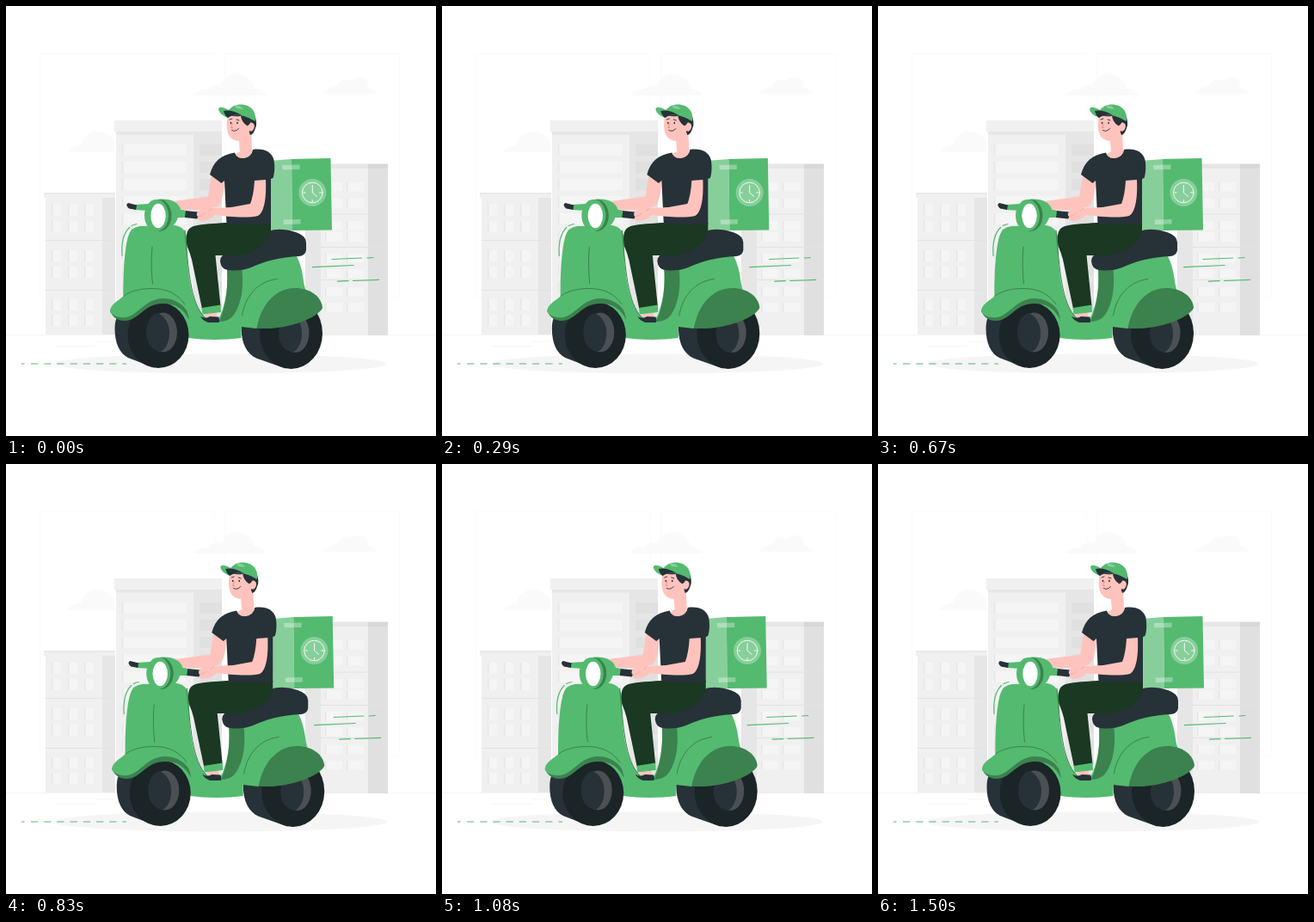
Recreate the animation shown at these times as an HTML page. Size 500 by 500 pixels, loop 1.54 s.

```html
<!DOCTYPE html>
<html lang="en">
<head>
<meta charset="utf-8">
<title>Scooter delivery</title>
<style>
  html, body { margin: 0; width: 100%; height: 100%; overflow: hidden; background: #fff; }
  svg { display: block; width: 100vw; height: 100vh; }
  .green { fill: #54ba6f; }
  .shade { fill: #3b824e; }
  .mint { fill: #87cf9a; }
  .glow { fill: #fff; fill-opacity: .32; }
  .dark { fill: #263238; }
  .tyre { fill: #1b2427; }
  .rim { fill: #4a5053; }
  .skin { fill: #ffc3bd; }
  .pants { fill: #1a3822; }
  .wall { fill: #f0f0f0; }
  .side { fill: #e6e6e6; }
  .deep { fill: #e0e0e0; }
  .pale { fill: #f5f5f5; }
  .cloud { fill: #fafafa; }
  .line { fill: none; stroke: #54ba6f; stroke-width: 1.2; stroke-linecap: round; }
  .crease { fill: none; stroke: #3b824e; stroke-width: 1; stroke-linecap: round; }
  .ink { fill: none; stroke: #263238; stroke-width: .9; stroke-linecap: round; }
  .faint { fill: none; stroke: #fafafa; }
  .floor { fill: none; stroke: #e2e2e2; }
  .white { fill: none; stroke: #fff; stroke-width: .9; stroke-linecap: round; }
</style>
</head>
<body>
<svg viewBox="0 0 500 500">
  <path class="faint" d="M39.500 55.500H242.500V339H39.500ZM254.500 55.500H457.500V339H254.500Z"/>
  <path class="faint" style="stroke:#f5f5f5" d="M0 382.500H500M57 395.500H104M105 390H126"/>

  <g class="cloud">
    <path d="M218 104C222 99 228 96 235 97C239 91 245 91 250 92C254 80 270 75 280 83C286 86 288 90 288 96C295 96 300 99 303 104Z"/>
    <path d="M368 102C372 96 378 94 384 94C386 87 394 84 401 87C407 81 416 82 420 87C421 90 420 93 420 95C426 95 430 98 432 102Z"/>
    <path d="M72 170C75 164 80 162 87 162C89 150 101 143 113 147C119 149 124 153 126 158V170Z"/>
  </g>

  <g id="city">
    <path class="wall" d="M126 133H251V146H126ZM128 146H218V382H128Z"/>
    <path class="side" d="M218 149H251V382H218ZM128 146H251V149.500H128Z"/>

    <path class="wall" d="M44 217H127V223H112V382H46V223H44Z"/>
    <path class="side" d="M112 223H127V382H112Z"/>
    <path class="floor" d="M44 218H127M46 272.500H127M46 330.500H127"/>

    <path class="wall" d="M366 184H421V383H366Z"/>
    <path class="side" d="M348 258H366V383H348ZM366 183.500H421V189H366Z"/>
    <path class="deep" d="M421 184H444V383H421Z"/>
    <path fill="#d8d8d8" d="M421 183.500H444V189H421Z"/>
    <path class="floor" d="M366 242H444M366 280.500H444M366 318.500H444"/>
  </g>

  <ellipse class="pale" cx="250" cy="416" rx="193" ry="11.500"/>
  <path class="line" style="stroke-linecap:butt" stroke-dasharray="8.3 6.9" d="M18 416H21.500M29 416H140"/>

  <g id="ride">
    <g class="line">
      <path d="M379 294.500L413.500 293M420 293L427 292.500M356.500 303.700L404 301.500M385.500 320.200L398 319.700M403.500 319.500L433.500 318.300"/>
      <path d="M135 290.500C134 278 136 265 143.500 257.500M146 255.500Q149 254 152 253.500"/>
    </g>

    <!-- Parcel box -->
    <path class="mint" d="M307 180L332 178L333 261H306Z"/>
    <path class="green" d="M332 178L377.500 177L379 260.500L333 261Z"/>
    <path class="glow" d="M321 185L341.500 184.500V190L321.500 190.200ZM322.500 248.500L342.500 248V253.500L323 254Z"/>
    <circle class="mint" cx="356.300" cy="217" r="16"/>
    <circle class="white" cx="356.300" cy="217" r="11.800"/>
    <path class="white" d="M356.300 208.500V217L361.500 221.500M356.300 225.500V227.500M346 217H348M364.500 217H366.500"/>

    <!-- Rear wheel -->
    <path class="dark" d="M306 337C286 337 273 352 273.500 375C274 393 280 404 291 409.500L325 421.500L340 350Z"/>
    <ellipse class="tyre" cx="331.500" cy="380.500" rx="36.500" ry="41.500"/>
    <ellipse class="rim" cx="336.500" cy="380" rx="16" ry="23"/>
    <path class="dark" d="M331 357C339 361 344 370 344 381C344 391 340 399 334 403C324 402 317 393 317 381C317 369 322 359 331 357Z"/>

    <!-- Chassis -->
    <path class="green" d="M136.500 340C136 310 138 282 142 268Q145 257 156 256L196 255C206 256 211 263 210.500 276C210 310 216 350 232 362C240 367 247 367 250 358C257 340 258 322 257 306L337 289C343 300 345 311 346.500 323L352 345L291 375L273.500 373V386C255 388.500 230 388.500 212 386L206 372H150Z"/>
    <path class="shade" d="M257 305L274 303C277 325 274 346 265 359Q259 367 248 367C253 355 259 335 257 305Z"/>
    <path class="shade" d="M291.500 374.500C297 345 315 328 336 328C354 328 367 338 368 351C362 364 322 378 291.500 374.500Z"/>
    <path class="crease" d="M274.500 360C278 337 293 320 315 317.500"/>
    <path class="crease" d="M170 280C168.500 295 169 310 170.500 323"/>
    <path class="crease" d="M208 261C212 305 214 345 231 362"/>

    <!-- Seat -->
    <path class="dark" d="M249 297Q249 290 256 288L305 262Q318 257 337 263Q349 267 349 275V284Q348 290 341 291C318 292 300 297 285 304Q272 309 258 307Q250 306 249 297Z"/>

    <!-- Legs -->
    <path class="skin" d="M231 356H245V364H232Z"/>
    <path class="dark" d="M226 361Q232 364 237 361L247 361.500Q249 365 247.500 368H235Q229 366 226 361Z"/>
    <path class="pants" d="M255 252H308V262C305 276 290 286 272 290L243.500 290L249.500 349L228 352L216 295Q214 287 210.500 279C209 268 209 259 218 256C230 253 242 253 255 252Z"/>
    <path class="green" d="M227.500 351L249.500 347.500L250 356L228.500 358.500Z"/>

    <!-- Front wheel and fender -->
    <path class="dark" d="M154 345C137 345 126.500 357 126.500 375C126.500 392 132 404 142 409L172 420.500L190 350Z"/>
    <ellipse class="tyre" cx="177" cy="382.500" rx="35.500" ry="38.500"/>
    <ellipse class="rim" cx="182.500" cy="379.500" rx="16.500" ry="23"/>
    <path class="dark" d="M176 357C184 360 190 369 190 380C190 390 186 399 180 402C170 401 163 392 163 380C163 368 168 359 176 357Z"/>
    <path class="shade" d="M121 354C124 364 134 368 144 365C157 361 163 346 182 346C198 346 206 352 213 365C211 350 203 337 188 332Q145 330 121 354Z"/>
    <path class="green" d="M121 356C120 348 130 343 137 337C150 327 178 326 192 333C203 338 209 347 212 357C204 344 194 340 182 340C163 341 156 356 143 361C134 364 125 361 121 356Z"/>
    <path class="crease" d="M137 337C150 327 178 326 192 333Q202 338 208 347"/>

    <!-- Far arm -->
    <path class="skin" d="M239 197L254 202C253 220 251 232 243 234Q222 239 197 236L194 227Q216 224 235 222Z"/>

    <!-- Handlebar and lamp -->
    <path class="green" d="M150 231L166 230V238L150 237ZM194 235L210 238L209 246L194 246Z"/>
    <path class="dark" d="M142 229L152 231.500L151 237L143 235.500Q138 231 142 229ZM209 238L223 239.500Q226 243 222 247.500L208 246Z"/>
    <path class="green" d="M176 225C190 223 200 228 203 236L200 246C197 255 190 261 178 262Z"/>
    <ellipse class="shade" cx="178.500" cy="243.500" rx="14" ry="18.500"/>
    <ellipse class="green" cx="175" cy="243.500" rx="14" ry="18.500"/>
    <ellipse cx="177" cy="244" rx="8.700" ry="14.300" fill="#fff"/>

    <!-- Neck and shirt -->
    <path class="skin" d="M270 148L285 145L286 169Q288 176 279 178Q268 178 267 172L272 169Z"/>
    <path class="dark" d="M266 170.500Q268 178 277 177Q286 175 287 167C299 165 309 169 311.500 179C313 188 312 196 310.500 200L308 201V254H256.500L254 203L250.500 206L237 196C241 181 250 173 266 170.500Z"/>

    <!-- Near arm -->
    <path class="skin" d="M289 203L302 202C303 224 300 240 293 244C281 247 257 245 243 243Q237 250 226 250Q222 249 223 245Q220 242 224 238Q230 233 240 235L262 234L284 230Q288 220 289 203Z"/>
    <path fill="none" stroke="#e9a49d" stroke-width=".7" d="M223 245Q228 244 231 241M240 235Q237 237 236 239"/>

    <!-- Head -->
    <path class="dark" d="M260 125L288 124Q293 136 290 142Q288 149 284 150L280 139Z"/>
    <path class="skin" d="M258 127Q270 124 276 129L280 138C286 132 291 138 288 143Q286 147 283 145C282 154 274 159 266 156C257 153 255 141 258 127Z"/>
    <path class="dark" d="M258 124L279 123L284 136Q282 140 280 139Q274 135 273 128Q266 129 258 127Z"/>
    <path class="green" d="M259 121C264 114 274 113 281 116C289 120 291 127 289.500 134Q280 128 271 127Q264 126 258 130Q248 126 247 120Q248 115 259 121Z"/>
    <path class="dark" d="M253 122Q262 120 274 127Q264 125 258 130Q254 127 253 122Z"/>
    <path class="mint" d="M266 116Q273 115 276 120L268 119Z"/>
    <path class="ink" d="M260 132L263 131M268 132L271 133M262.500 144.500Q267 147 270.500 142.500"/>
    <path fill="none" stroke="#ed9189" d="M263.500 136.500L261.500 141.500L264 141.500"/>
    <ellipse class="dark" cx="261.500" cy="136" rx=".8" ry="1.300"/>
    <ellipse class="dark" cx="269" cy="136" rx=".8" ry="1.300"/>
  </g>
</svg>
<script>
  const city = document.getElementById('city');
  const ride = document.getElementById('ride');

  function rect(cls, x, y, w, h) {
    const r = document.createElementNS('http://www.w3.org/2000/svg', 'rect');
    r.setAttribute('class', cls);
    Object.entries({ x, y, width: w, height: h }).forEach(([k, v]) => r.setAttribute(k, v));
    city.append(r);
  }

  function windows(xs, ys, w, h) {
    for (const y of ys) for (const x of xs) {
      rect('side', x, y, 2, h);
      rect('pale', x + 1.5, y, w - 1.5, h);
    }
  }

  windows([53, 72, 91], [231, 250, 284, 303, 341, 359], 11, 13);
  windows([371, 396], [205, 224, 250, 263, 288, 306, 327, 345], 20, 10.5);
  const storeys = Array.from({ length: 11 }, (_, i) => 161 + 20 * i);
  windows([135], storeys, 75, 13);
  storeys.forEach(y => rect('deep', 225, y, 26, 13));

  // Horizontal shake: offset in px at every tenth of a cycle.
  const stops = [0, -1, 2, -4, 4, -4, 4, -4, 2, -1, 0];
  const LOOP = 1540, CYCLE = 1500, FPS = 24, LEAD = 30;

  function shake(ms) {
    const p = (ms % CYCLE) / CYCLE * 10;
    const i = Math.floor(p);
    return stops[i] + (stops[i + 1] - stops[i]) * (p - i);
  }

  const rest = shake(LEAD);

  function draw(now) {
    const step = Math.min(36, Math.floor((now % LOOP + 10) * FPS / 1000));
    const x = shake(step * 1000 / FPS + LEAD) - rest;
    ride.setAttribute('transform', `translate(${x.toFixed(2)} 0)`);
    requestAnimationFrame(draw);
  }
  draw(performance.now());
</script>
</body>
</html>
```
